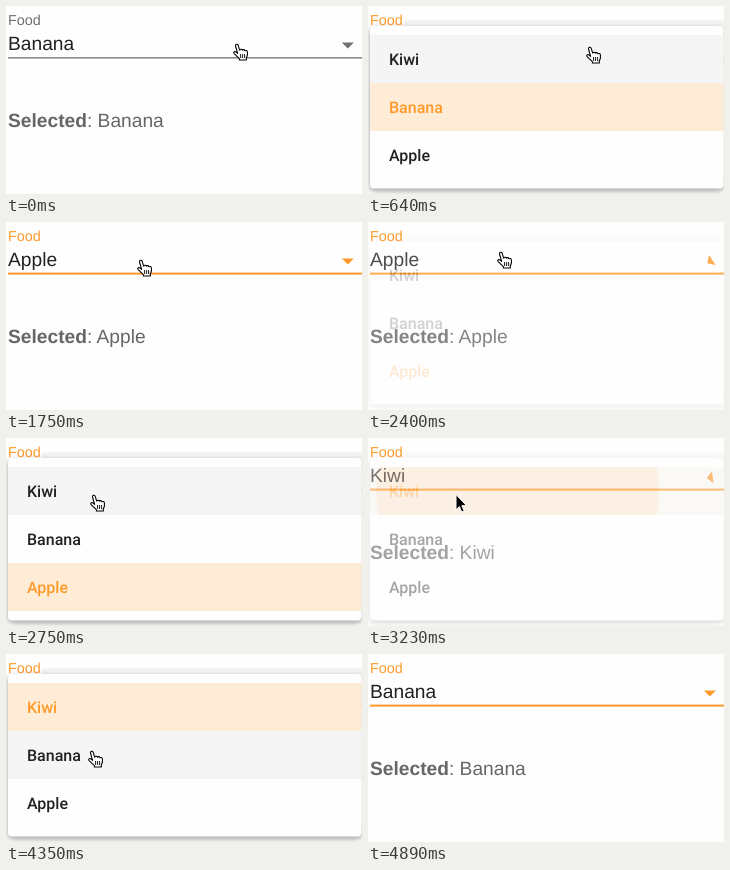
An HTML page for the animation above (5490 ms loop, 356 by 188 pixels).

```html
<!DOCTYPE html>
<html lang="en">
<head>
<meta charset="utf-8">
<title>Food select</title>
<style>
  html, body { margin: 0; width: 100%; height: 100%; overflow: hidden; background: #fefefe; }
  #stage { display: block; width: 100vw; height: 100vh; text-rendering: geometricPrecision; }
  .field { font: 19.2px "Liberation Sans", Arial, sans-serif; }
  .label { font-size: 14.4px; }
  .option { font: 500 16px Roboto, sans-serif; }
  .note { fill: #666; }
  .note .key { font-weight: 700; }
  .paper { fill: #fefefe; filter: drop-shadow(0 2px 2px rgba(0,0,0,.2)) drop-shadow(0 3px 4px rgba(0,0,0,.2)); }
  .hand { fill: #fff; stroke: #000; stroke-width: 1.1; stroke-linejoin: round; }
  .arrow { fill: #000; stroke: #fff; stroke-linejoin: round; }
</style>
</head>
<body>
<svg id="stage" viewBox="0 0 356 188" xmlns="http://www.w3.org/2000/svg">
  <g class="field">
    <text id="label" class="label" x="2" y="19.4">Food</text>
    <text id="value" x="2" y="43.5" fill="#212121"></text>
    <rect id="line" x="2" width="354"/>
    <path id="caret" d="M-6-3H6L0 3Z"/>
    <text class="note" x="2" y="120.7"><tspan class="key">Selected</tspan>: <tspan id="picked"></tspan></text>
  </g>
  <g id="panel">
    <rect x="36" y="14" width="320" height="12" rx="3" fill="#f4f4f4"/>
    <rect class="paper" x="2" y="20" width="353.5" height="162.5" rx="4"/>
    <g id="rows"></g>
  </g>
  <g id="cursor">
    <g id="hand" class="hand">
      <path d="M-1.5 2C-1.9.1.6-.5 1.2 1.3L2.7 6.2C3 4.9 5.1 4.9 5.4 6.2 5.8 5.3 7.7 5.4 8 6.8 8.6 6.1 10.4 6.5 10.4 8V11.2L9.3 14V16H2.4V14.6L-2.9 9.6C-3.9 8.2-2.6 7-1.3 7.8L.6 9.4Z"/>
      <path d="M3.6 10v4M5.6 10v4M7.6 10v4" stroke-width=".9"/>
    </g>
    <path id="arrow" class="arrow" d="M0-.5V14.8L3.4 11.6 5.7 17 8.2 16 5.9 10.7H10.5Z"/>
  </g>
</svg>
<script>
const LOOP = 5490;
const OPTIONS = ['Kiwi', 'Banana', 'Apple'];
const ORANGE = [255, 154, 42], GREY = [112, 112, 112], INK = [33, 33, 33];
const PAPER = [254, 254, 254], HOVER = [245, 245, 245], CHOSEN = [255, 236, 215];
const ROW_TOP = 29, ROW_H = 48;

// Bursts of motion: start, end, number of steps
const BURSTS = [
  [300, 820, 9], [870, 930, 2], [1220, 1750, 10], [1810, 1810, 1], [2050, 2220, 4],
  [2400, 2750, 7], [3170, 3700, 10], [3940, 4350, 8], [4530, 4890, 7]
];
const VISITS = [
  { open: 270, press: 1203, close: 1312, from: 1, to: 2 },
  { open: 2365, press: 3110, close: 3184, from: 2, to: 0 },
  { open: 3910, press: 4490, close: 4580, from: 0, to: 1 }
];
// Pointer path: time, x, y
const PATH = [
  [0, 231, 38], [500, 231, 38], [625, 222, 41], [820, 121, 119], [930, 105, 137],
  [1430, 106, 137], [1750, 135, 38], [1810, 133, 21], [1990, 133, 21], [2220, 133, 30],
  [2400, 133, 30], [2750, 88, 57], [3290, 88, 57], [3700, 112, 34], [4050, 112, 34],
  [4350, 86, 97], [4590, 86, 97], [4840, 120, 200]
];

const $ = id => document.getElementById(id);
const clamp = v => Math.min(1, Math.max(0, v));
const span = (t, start, length) => clamp((t - start) / length);
const mix = (a, b, k) => a + (b - a) * k;
const blend = (a, b, k) => a.map((v, i) => mix(v, b[i], k));
const rgb = c => `rgb(${c.map(Math.round)})`;
const smooth = k => k * k * (3 - 2 * k);
const set = (el, attrs) => { for (const k in attrs) el.setAttribute(k, attrs[k]); };

function make(tag, parent, attrs) {
  const el = document.createElementNS('http://www.w3.org/2000/svg', tag);
  set(el, attrs);
  return parent.appendChild(el);
}

const rows = OPTIONS.map((name, i) => {
  const box = make('svg', $('rows'), { x: 2, y: ROW_TOP + i * ROW_H, width: 353.5, height: ROW_H, overflow: 'hidden' });
  const back = make('rect', box, { width: 354, height: ROW_H });
  const ripple = make('circle', box, { cy: ROW_H / 2, fill: rgb(ORANGE) });
  const text = make('text', box, { class: 'option', x: 19, y: 29.7 });
  text.textContent = name;
  return { back, ripple, text };
});

function stepTime(t) {
  let held = 0;
  for (const [a, b, n] of BURSTS) {
    if (t < a) break;
    if (t >= b) { held = b; continue; }
    const step = (b - a) / (n - 1);
    held = a + Math.floor((t - a) / step) * step;
  }
  return held;
}

function pointerAt(t) {
  const i = PATH.findIndex(p => p[0] > t);
  if (i < 0) return PATH[PATH.length - 1].slice(1);
  const [a, b] = [PATH[i - 1], PATH[i]];
  const k = smooth(span(t, a[0], b[0] - a[0]));
  return [mix(a[1], b[1], k), mix(a[2], b[2], k)];
}

function drawRow(row, i, t, visit, hovered) {
  const { open, press, close, from, to } = visit;
  const done = t >= close;
  let back = i === hovered ? HOVER : PAPER;
  if (i === from) back = blend(CHOSEN, back, span(t, close, 40));
  if (i === to && done) back = blend(HOVER, CHOSEN, .3);
  back = blend(PAPER, back, span(t, open + 40, 140));
  row.back.setAttribute('fill', rgb(back));
  row.text.setAttribute('fill', rgb(i === (done ? to : from) ? ORANGE : INK));

  const e = smooth(span(t, press, 190));
  set(row.ripple, {
    cx: mix(i === 2 ? 104 : 86, 176, e),
    r: 68 + 107 * e,
    opacity: i === to ? .24 * span(t, press, 75) : 0
  });
}

function draw(now) {
  const t = stepTime(now % LOOP);
  const visit = VISITS.filter(v => t >= v.open).pop();
  const [x, y] = pointerAt(t);
  const focus = span(t, 270, 100);
  const accent = rgb(blend(GREY, ORANGE, focus));

  let shown = 0, turn = 0, pick = 1, live = false;
  if (visit) {
    const { open, close, from, to } = visit;
    live = t < close;
    shown = live ? span(t, open, 180) : 1 - span(t, close, 75);
    turn = span(t, open, 110) - span(t, close - 20, 120);
    pick = live ? from : to;
    const hovered = live || shown ? Math.floor((y - ROW_TOP) / ROW_H) : -1;
    rows.forEach((row, i) => drawRow(row, i, t, visit, hovered));
  }

  $('panel').setAttribute('opacity', shown);
  $('label').setAttribute('fill', accent);
  set($('line'), { y: focus ? 50.6 : 51.2, height: focus ? 2 : 1.3, fill: accent });
  set($('caret'), { fill: accent, transform: `translate(341.8 39.6) rotate(${180 * turn})` });
  $('value').textContent = $('picked').textContent = OPTIONS[pick];

  const hand = live || y < 54;
  $('cursor').setAttribute('transform', `translate(${x} ${y})`);
  $('hand').style.display = hand ? '' : 'none';
  $('arrow').style.display = hand ? 'none' : '';
}

const began = performance.now();
(function tick() {
  draw(performance.now() - began);
  requestAnimationFrame(tick);
})();
</script>
</body>
</html>
```
